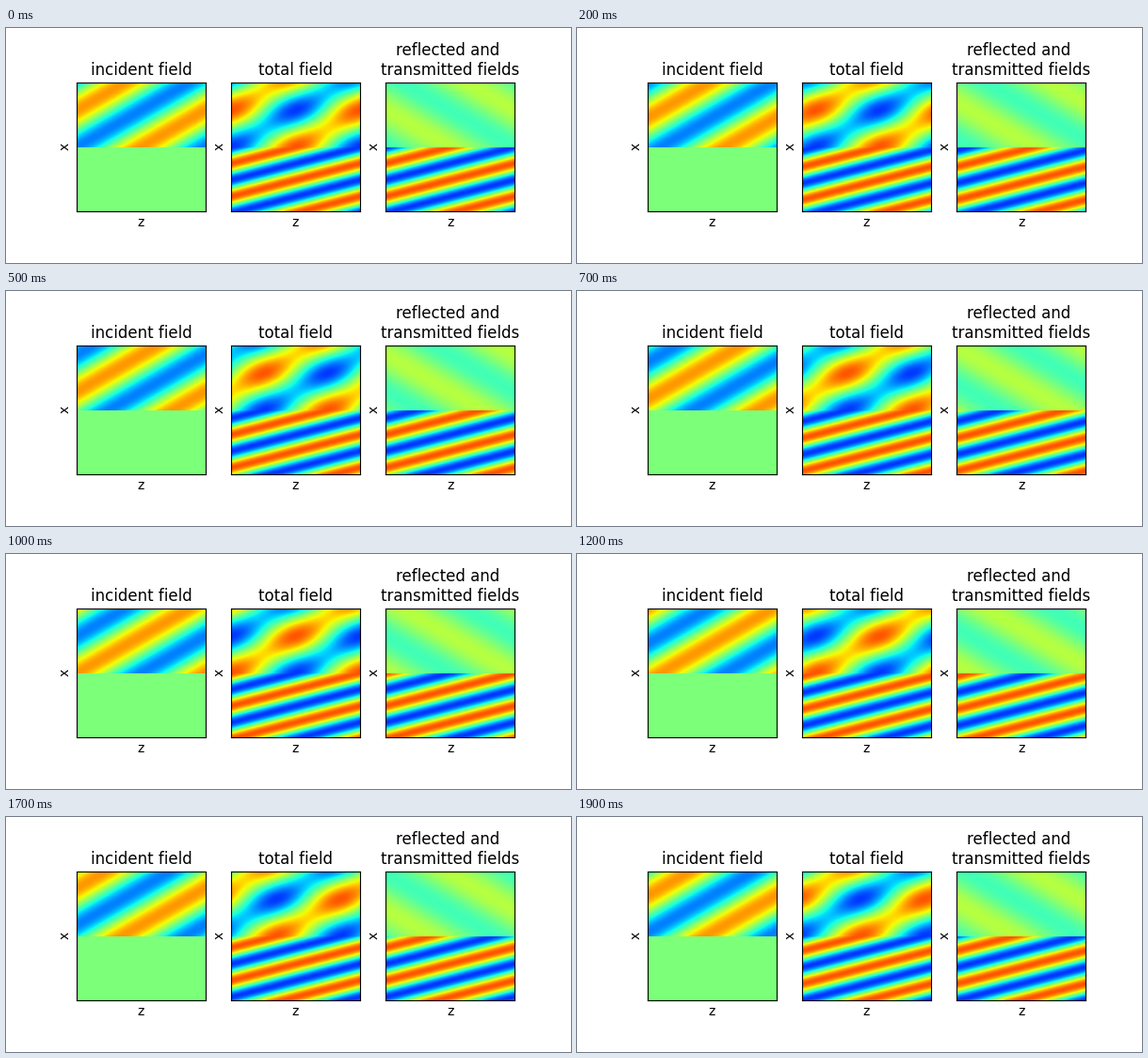
Recreate the animation shown at these times as a matplotlib script. Size 600 px wide and 250 px high, loop 2 s.

```python
import numpy as np
import matplotlib.pyplot as plt
from matplotlib.animation import FuncAnimation

FRAMES = 20
INTERVAL = 100  # ms
N = 137         # samples along each side

# Plane wave crossing from index n1 (above) into n2 (below), p-polarised.
n1, n2 = 1.0, 2.0
theta1 = np.radians(30)
theta2 = np.arcsin(n1 * np.sin(theta1) / n2)
a, b = n2 * np.cos(theta1), n1 * np.cos(theta2)
r = (a - b) / (a + b)
t = 1 + r

# One horizontal wavelength spans the panel; depth grows downwards.
kz = np.pi
k1 = kz / np.tan(theta1)
k2 = kz / np.tan(theta2)
z, depth = np.meshgrid(np.linspace(-1, 1, N), np.linspace(-1, 1, N))
above = depth <= 0


def fields(frame):
    """Return the incident, total and outgoing fields."""
    phase = kz * z - 2 * np.pi * frame / FRAMES
    incident = np.where(above, np.cos(phase + k1 * depth), 0)
    outgoing = np.where(above,
                        r * np.cos(phase - k1 * depth),
                        t * np.cos(phase + k2 * depth))
    return incident, incident + outgoing, outgoing


plt.rcParams["font.family"] = "DejaVu Sans"
fig, axes = plt.subplots(1, 3, figsize=(6, 2.5), dpi=100)
titles = ("incident field", "total field",
          "reflected and \ntransmitted fields")

images = []
for ax, title, field in zip(axes, titles, fields(0)):
    images.append(ax.imshow(field, cmap="jet", vmin=-2, vmax=2,
                            interpolation="nearest"))
    ax.set_title(title)
    ax.set_xlabel("z")
    ax.set_ylabel("x")
    ax.set_xticks([])
    ax.set_yticks([])


def update(frame):
    for image, field in zip(images, fields(frame)):
        image.set_data(field)
    return images


anim = FuncAnimation(fig, update, frames=FRAMES, interval=INTERVAL,
                     init_func=lambda: update(0), repeat=True)
plt.show()
```
